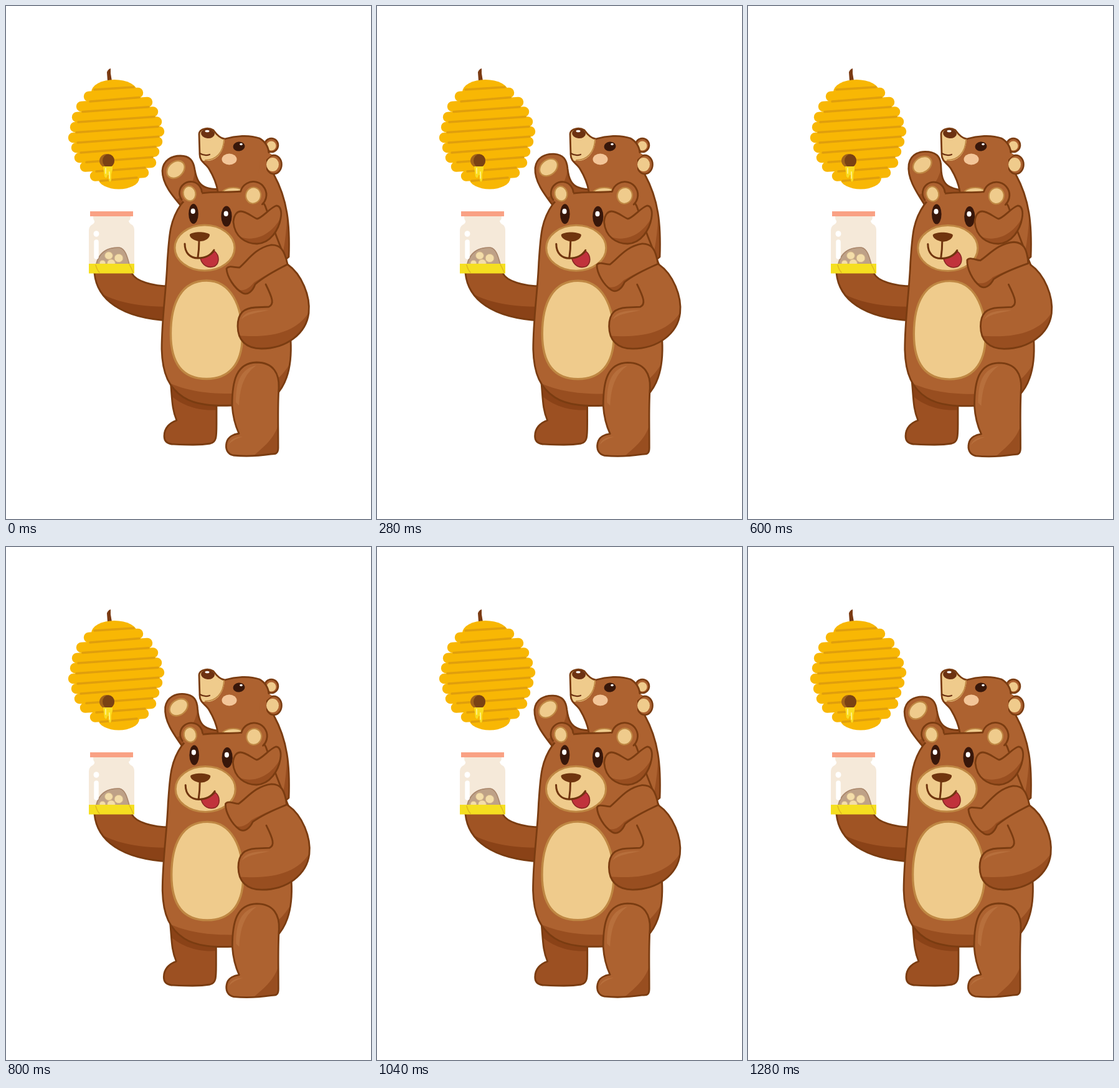
These frames come from a looping animation (586 px wide and 822 px high, 1320 ms). An HTML page with a canvas:

```html
<!DOCTYPE html>
<html lang="en">
<head>
<meta charset="utf-8">
<title>Bears and honey</title>
<style>
html, body { margin: 0; width: 100%; height: 100%; overflow: hidden; background: #fff; }
canvas { display: block; width: 586px; height: 822px; }
</style>
</head>
<body>
<canvas id="stage" width="586" height="822"></canvas>
<script>
const ctx = document.getElementById('stage').getContext('2d');
const LOOP = 1320, STEP = 40;
const FUR = '#ad6230', SHADE = '#984e20', LINE = '#7a3c11', BACK = '#9c5022', DEEP = '#8a4217';
const CREAM = '#efcb8c', CREAM_EDGE = '#bf8743', DARK = '#38170a', GLOW = '#b76f3c';

// Sway amount over time: [ms, 0..1]
const SWAY = [[0, 0], [280, .43], [480, .76], [600, 1], [800, .67], [1040, .28], [1280, .03], [1320, 0]];

function swayAt(t) {
  const i = SWAY.findIndex(k => k[0] > t);
  const [t0, a] = SWAY[i - 1], [t1, b] = SWAY[i];
  return a + (b - a) * (t - t0) / (t1 - t0);
}

const cache = {};
const path = d => cache[d] || (cache[d] = new Path2D(d));

function fill(d, color) {
  ctx.fillStyle = color;
  ctx.fill(path(d));
}

function line(d, color = LINE, width = 2.8) {
  ctx.strokeStyle = color;
  ctx.lineWidth = width;
  ctx.stroke(path(d));
}

function oval(x, y, rx, ry, color, edge, turn = 0, width = 2.6) {
  ctx.beginPath();
  ctx.ellipse(x, y, rx, ry, turn, 0, 7);
  ctx.fillStyle = color;
  ctx.fill();
  if (edge) {
    ctx.strokeStyle = edge;
    ctx.lineWidth = width;
    ctx.stroke();
  }
}

// Filled form with clipped shading: [path, colour] pairs
function form(d, color, shades = [], outline = d) {
  fill(d, color);
  ctx.save();
  ctx.clip(path(d));
  shades.forEach(s => fill(...s));
  ctx.restore();
  line(outline);
}

function moved(dx, dy, draw) {
  ctx.save();
  ctx.translate(dx, dy);
  draw();
  ctx.restore();
}

function turned(x, y, angle, draw) {
  ctx.save();
  ctx.translate(x, y);
  ctx.rotate(angle);
  ctx.translate(-x, -y);
  draw();
  ctx.restore();
}

// Hive rows: left end, right end
const ROWS = [
  [133, 145, 212, 139], [121, 161, 227, 154], [114, 178, 236, 169.5],
  [111, 194, 242, 185.5], [108, 211, 246, 201], [113, 227, 243, 217.5],
  [118, 243, 238, 233.5], [127, 257.5, 233, 251], [143, 272.5, 221, 267]
];

function hive() {
  fill('M163 120L162 106Q164 101 168 100L168 108L170 120Z', '#7b3a12');
  oval(174, 138, 37, 20, '#f8b704');
  oval(181, 276, 33, 17.5, '#f8b704');
  ROWS.forEach(([a, b, c, d]) => line(`M${a} ${b}L${c} ${d}`, '#f8b704', 16.5));
  ROWS.forEach(([a, b, c, d], i) => {
    const n = ROWS[i + 1] || [150, 288, 208, 283];
    const x0 = Math.max(a, n[0]) + 2, x1 = Math.min(c, n[2]) + 2;
    line(`M${x0} ${(b + n[1]) / 2}L${x1} ${(d + n[3]) / 2}`, '#e09f0c', 3.6);
  });
  line('M142 134L205 130', '#e09f0c', 3.6);
  oval(162, 248, 12, 11, '#a3641a');
  oval(164.5, 248, 9.5, 10.5, '#7a4214');
  fill('M156 257H171V263Q170 265 169 270V279Q167 284 165 279V271Q163 269 162 274Q160 277 158 273Z', '#fbdc20');
  line('M160 260V268M166 266V276', '#fdef83', 2);
}

function jar() {
  fill('M140 337H200Q200 343 197 344Q197 348 203 351Q206 354 206 360V428H133V360Q133 354 137 351Q143 348 142 344Q140 343 140 337Z', '#f5e9d9');
  fill('M144 414C148 395 162 385 182 387C192 389 195 403 198 414Z', '#bea187');
  line('M145 414C149 396 162 386 182 387C192 389 195 403 198 414', '#a9866b', 1.6);
  [[165, 400, 6.5], [181, 404, 7], [155, 412, 5], [169, 412, 6.5]].forEach(([x, y, r]) => oval(x, y, r, r * .95, '#f3dda9', '#d3b489', 0, 1));
  fill('M133 413H206V428.5H133Z', '#f5df20');
  line('M144 415Q146 423 150 427M198 414Q202 421 204 427', '#dfb81d', 1.5);
  fill('M135 329H204V337H135Z', '#f9a184');
  oval(145, 365, 4.5, 4.8, '#fff');
  line('M145 378V402', '#fff', 7.5);
}

const BACK_LEG = 'M264 600C267 630 266 645 274 664C262 668 254 677 254 689C254 697 258 701 266 702C290 703 310 704 328 701C338 699 338 690 338 670L338 630Z';
const JAR_ARM = 'M142 428C146 470 185 500 262 504L264 449C235 449 208 441 202 428Z';

function backParts(p) {
  moved(-p, 0, () => form(BACK_LEG, BACK, [['M260 600L340 620V647C310 650 280 640 260 620Z', DEEP]]));
  form(JAR_ARM, '#a05424', [['M140 452C165 472 205 482 264 482V510H140Z', DEEP]],
    'M142 428C146 470 185 500 262 504M264 449C235 449 208 441 202 428');
}

const CUB_ARM = 'M286 326C266 303 251 285 251 264C252 247 266 240 280 240C295 240 301 248 303 262C306 280 312 288 322 291C330 294 338 294 352 293L352 345L300 345Z';
const CUB_BODY = 'M310 205C311 196 325 194 333 199C338 206 344 212 351 213C368 208 390 206 407 212C416 217 423 227 422 240L430 270C452 310 456 350 454 402L420 430L340 330V297C338 284 332 271 326 261C321 252 311 250 311 238Z';

function cub(p) {
  turned(330, 310, .14 * p, () => {
    form(CUB_ARM, FUR, [['M303 262C302 288 288 303 274 310L300 345H360V290H320Z', SHADE]]);
    oval(272.5, 262, 16, 12, CREAM, CREAM_EDGE, -.75, 2.4);
  });
  oval(426, 223, 11, 11, FUR, LINE);
  oval(426, 224, 7.5, 7.5, CREAM);
  form(CUB_BODY, FUR, [
    ['M305 190H333C338 206 344 212 351 213C350 235 338 249 321 248L305 248Z', CREAM],
    ['M452 310C452 345 449 385 438 425H465V310Z', SHADE]
  ]);
  line('M350 214C349 235 337 247 320 247', CREAM_EDGE, 1.8);
  oval(430, 254, 12.5, 15, FUR, LINE);
  oval(428, 254, 10, 11, CREAM);
  fill('M410 236Q421 234 427 238L418 246L418 268L405 268Z', FUR);
  oval(365, 302, 19, 11, CREAM, CREAM_EDGE, 0, 2);
  oval(324, 204.5, 11, 7.5, '#6d3212', null, .1);
  oval(323, 200.5, 3.5, 1.8, '#fff');
  line('M311 236Q319 241 327 238', '#6d3212', 2.2);
  oval(374, 225, 9.5, 7.5, DARK, null, -.1);
  oval(377.5, 221.5, 2.3, 1.8, '#fff');
  oval(358.5, 245.5, 12, 9, '#f3c598');
}

const BODY = 'M281 318C262 345 262 370 259 410C257 460 250 500 250 550C251 590 262 612 285 627C305 640 335 641 362 640H405C455 625 459 570 457 535L452 414C440 385 425 345 416 320C405 299 390 297 377 297C355 299 335 297 313 300C300 303 290 306 281 318Z';
const BELLY = 'M322 440C361 440 379.5 480 379.5 530C379 575 357 597.5 322 597.5C285 597.5 264.5 575 264.5 525C264.5 475 282 440 322 440Z';

// Ear in front of the head, outlined from angle a round to b
function ear(x, y, r, a, b) {
  oval(x, y, r, r, FUR);
  ctx.beginPath();
  ctx.arc(x, y, r, a, b);
  ctx.strokeStyle = LINE;
  ctx.lineWidth = 2.8;
  ctx.stroke();
}

function bear() {
  form(BODY, FUR, [['M245 596C285 617 320 622 370 621C420 619 448 594 462 560V650H245Z', SHADE]]);
  ear(296.5, 299.5, 18, 2.5, 6.2);
  ear(397, 302.5, 21, 3.4, 7.1);
  oval(294.5, 300.5, 10, 12, CREAM, CREAM_EDGE, -.2, 2.2);
  oval(397, 303.5, 12, 13, CREAM, CREAM_EDGE, .2, 2.2);
  fill(BELLY, CREAM);
  line(BELLY, CREAM_EDGE, 3.4);
  oval(319, 387.5, 48, 36.5, CREAM, CREAM_EDGE, 0, 3);
  [[301, 333, 7.8, 16], [354, 337, 8.6, 16.5]].forEach(([x, y, rx, ry]) => {
    oval(x, y, rx, ry, DARK);
    oval(x - .8, y - 4.3, 3.6, 4.3, '#fff');
  });
  fill('M295 366C301 361 320 361 327 366C328 372 318 378 310 377C302 376 294 371 295 366Z', '#70350f');
  const tongue = 'M312 404C320 403 329 399 335 393C343 400 343 412 335 417C325 421 315 416 312 404Z';
  fill(tongue, '#c1323c');
  line(tongue, '#8a2724', 1.6);
  line('M310 376Q310 390 308 403M287 381C287 396 296 404 308 404C320 404 329 399 334 391', '#70350f', 3);
}

const FRONT_LEG = 'M363 640C363 600 370 572 402 571C430 571 439 590 438 612C436 640 437 660 437 708C437 718 432 718 425 718C405 721 385 722 365 720C355 718 352 709 354 700C356 690 366 686 374 685C366 668 364 655 363 640Z';
const ARM_EDGE = 'M452 414C475 430 489 465 486 492C482 525 450 549 410 549C385 549 372 535 372 513C372 492 382 484 400 483L422 482C431 478 428 468 417 446';

function frontLeg() {
  form(FRONT_LEG, FUR, [
    ['M440 660C434 692 415 705 396 722H440Z', SHADE],
    ['M369 635C369 600 378 581 402 576C385 588 376 605 374 640Z', GLOW],
    ['M357 703Q362 690 380 690Q365 694 357 703Z', GLOW]
  ]);
}

function bearArm() {
  form(ARM_EDGE, FUR, [
    ['M490 484C472 520 432 533 372 528V555H490Z', SHADE],
    ['M378 502C383 490 395 488 422 487C405 492 388 492 378 502Z', GLOW]
  ], ARM_EDGE);
}

const CUB_HAND = 'M365 346C366 333 372 329 377 329C386 329 395 338 403 341C411 340 424 323 434 320C441 320 443 330 441 340C438 358 425 380 403 381C385 381 367 370 365 346Z';
const CUB_LEG = 'M354 421C357 415 366 419 375 419C388 408 400 388 425 383C440 382 447 390 452 414C430 425 410 437 400 446C396 457 388 464 380 460C366 452 355 434 354 421Z';

function cubFront(p) {
  moved(-p, 0, () => form(CUB_HAND, FUR, [['M362 361C380 379 420 380 443 336V390H362Z', SHADE]]));
  turned(464, 397, .125 * p, () => form(CUB_LEG, FUR, [['M360 447C375 461 388 456 398 443C415 432 435 421 455 411V470H360Z', SHADE]]));
}

function frame() {
  const t = Math.floor(performance.now() % LOOP / STEP) * STEP;
  const p = swayAt(t);
  ctx.clearRect(0, 0, 586, 822);
  ctx.lineCap = ctx.lineJoin = 'round';
  hive();
  backParts(p);
  jar();
  cub(p);
  moved(1.8 * p, .6 * p, bear);
  moved(.5 * p, .8 * p, frontLeg);
  moved(1.4 * p, .3 * p, bearArm);
  cubFront(p);
  requestAnimationFrame(frame);
}
frame();
</script>
</body>
</html>
```
